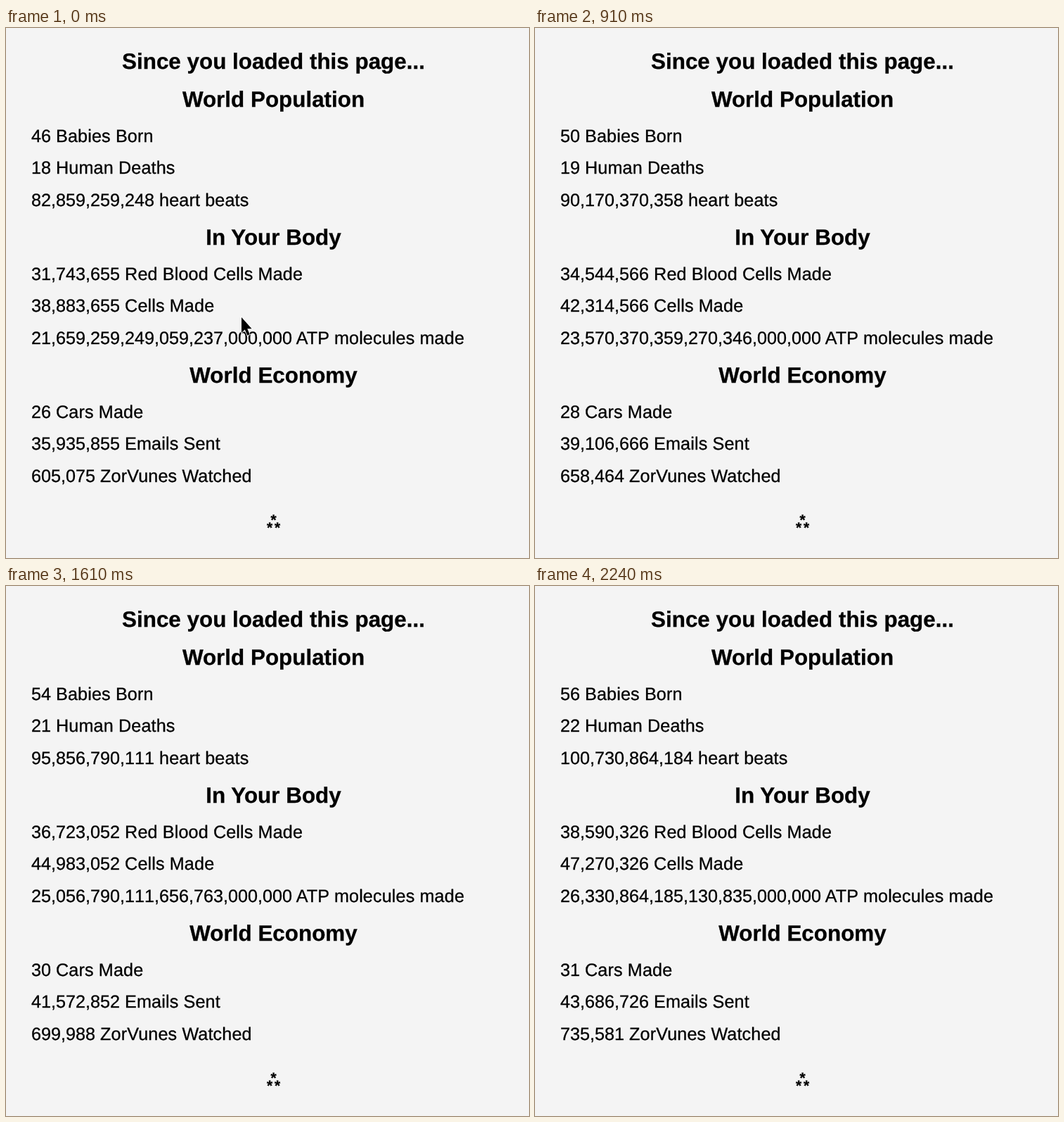
Animation of 744 by 753 pixels, one loop 2.31 s. Source, as an HTML page:

```html
<!DOCTYPE html>
<html lang="en">
<head>
<meta charset="utf-8">
<title>Since you loaded this page</title>
<style>
  html, body { margin: 0; width: 100%; height: 100%; overflow: hidden; background: #f4f4f4; }
  svg { display: block; width: 744px; height: 753px; }
  text {
    font: 25.2px "Liberation Sans", Arial, Helvetica, sans-serif;
    text-rendering: geometricPrecision;
    stroke: #000;
    stroke-width: .3;
  }
  .value { font-kerning: none; }
  .label { letter-spacing: .12px; }
  .heading { font-size: 31.4px; font-weight: bold; }
  .star { font-size: 21px; font-weight: bold; }
  .heading, .star { text-anchor: middle; }
  .pointer { stroke: #fff; stroke-width: 1.6; paint-order: stroke; }
</style>
</head>
<body>
<svg id="stage" viewBox="0 0 744 753">
  <text class="heading" x="380.5" y="58">Since you loaded this page...</text>
  <text class="star" x="380.6" y="706">*</text>
  <text class="star" x="375.2" y="717.4">*</text>
  <text class="star" x="386" y="717.4">*</text>
</svg>
<script>
  const FRAME = 70, FRAMES = 33;
  const FIRST_TICK = 102, TICKS_PER_FRAME = 0.7, TICK_PHASE = 0.4;

  const stage = document.getElementById("stage");

  function add(parent, tag, attrs, content = "") {
    const node = document.createElementNS("http://www.w3.org/2000/svg", tag);
    for (const key in attrs) node.setAttribute(key, attrs[key]);
    node.textContent = content;
    return parent.appendChild(node);
  }

  const group = n => n.toLocaleString("en-US");

  // Rates are in hundredths per tick, so the products stay exact.
  const counter = rate => tick => group(Math.ceil(rate * tick / 100));

  // Too large for a double: thousandths of a million molecules.
  const molecules = tick => {
    const total = 21659259249059237800n + BigInt(tick - FIRST_TICK) * 212345678912345357n;
    return group(total / 1000n) + ",000,000";
  };

  const sections = [
    ["World Population", [
      ["Babies Born", counter(45)],
      ["Human Deaths", counter(17)],
      ["heart beats", counter(81234567890)]
    ]],
    ["In Your Body", [
      ["Red Blood Cells Made", counter(31121230)],
      ["Cells Made", counter(38121230)],
      ["ATP molecules made", molecules]
    ]],
    ["World Economy", [
      ["Cars Made", counter(25)],
      ["Emails Sent", counter(35231230)],
      ["ZorVunes Watched", counter(593210)]
    ]]
  ];

  const rows = [];
  sections.forEach(([title, items], s) => {
    const top = 112 + s * 196;
    add(stage, "text", { class: "heading", x: 380.5, y: top }, title);
    items.forEach(([label, format], i) => {
      const line = add(stage, "text", { x: 35.9, y: top + 50 + i * 45.3 });
      const value = add(line, "tspan", { class: "value" });
      add(line, "tspan", { class: "label" }, " " + label);
      rows.push({ value, format });
    });
  });

  const pointer = add(stage, "path", {
    class: "pointer",
    d: "M335 411V433L339.8 428.6 343.3 436.8 346.8 435.3 343.3 427.3H349.6Z"
  });

  const start = performance.now();
  let shown = -1;

  function draw(now) {
    const frame = Math.floor(Math.max(0, now - start) / FRAME) % FRAMES;
    if (frame !== shown) {
      shown = frame;
      const tick = FIRST_TICK + Math.floor(frame * TICKS_PER_FRAME + TICK_PHASE);
      for (const { value, format } of rows) value.textContent = format(tick);
      pointer.style.display = frame === 0 ? "" : "none";
    }
    requestAnimationFrame(draw);
  }
  draw(start);
</script>
</body>
</html>
```
